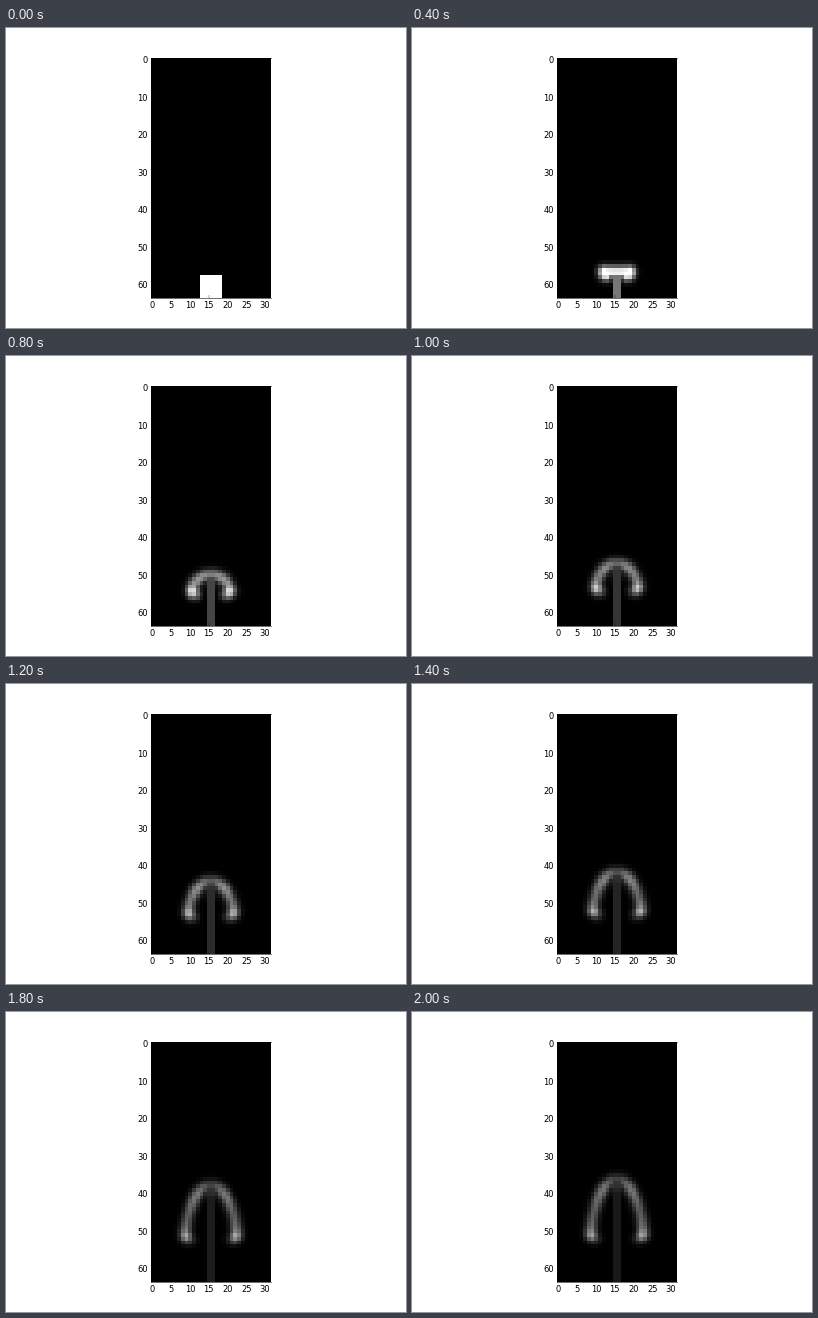
These frames come from a looping animation (400x300 px, 2.1 s). A matplotlib script:

```python
import numpy as np
import matplotlib.pyplot as plt
from matplotlib.animation import FuncAnimation

ROWS, COLS = 64, 32
FRAMES, INTERVAL = 21, 100
LIFTOFF = 4     # frames until the square has become a cap

row, col = np.mgrid[:ROWS, :COLS] + .5
off = abs(col - COLS / 2)


def bump(x, centre, width):
    return np.exp(-((x - centre) / width)**2 / 2)


def ramp(d, soft):
    return np.clip(d / soft + .5, 0, 1)


def smoothstep(x):
    x = np.clip(x, 0, 1)
    return x * x * (3 - 2 * x)


def block(u):
    """Initial square, lifting and spreading."""
    soft = .02 + u
    return (ramp(3 + 1.2 * u - off, soft) * ramp(row - 58 + 3 * u, soft)
            * ramp(64 - 5 * u - row, soft))


def plume(t):
    """Rising arch that curls inwards at its tips, with a trailing stem."""
    side = 49.5 + 11.8 * np.exp(-t / 9)
    apex = min(65.2 - 2.15 * t + .036 * t * t, side)
    reach = 7.4 * (1 - np.exp(-(t + .6) / 7.6))
    curl = .25 * reach

    # Half ellipse from apex to widest point, then a small circle inwards
    a = np.linspace(0, 2.8, 80)
    arch = a < np.pi / 2
    x = np.where(arch, reach * np.sin(a), reach - curl + curl * np.sin(a))
    y = side - np.where(arch, (side - apex) * abs(np.cos(a))**1.25,
                        curl * np.cos(a))
    glow = (.14 + 2.4 * np.exp(-t / 3.9)
            + .3 * min(t / 12, 1)**2 * bump(a, .6, .35)
            + .5 * bump(a, 1.9, .45))

    dist = np.hypot(off[..., None] - x, row[..., None] - y)
    ridge = (np.minimum(glow, 1.15) * bump(dist, 0, 1.1)).max(axis=-1)
    core = (.2 * smoothstep((t - 4) / 6)
            * bump(off, 0, 1.8) * bump(row, apex + 1.5, 1.8))
    return np.maximum(ridge, core), apex


def density(t):
    smoke, apex = plume(t)
    u = min(t / LIFTOFF, 1)
    mix = smoothstep(u)
    smoke = mix * smoke + (1 - mix) * block(u**1.3)
    stem = (.08 + .8 * np.exp(-t / 5.5)) * (off < 1) * (row > apex)
    return np.clip(np.maximum(smoke, stem), 0, 1)


plt.rcParams.update({"font.family": "DejaVu Sans", "font.size": 12})
fig, ax = plt.subplots(figsize=(8, 6), dpi=50, facecolor="white")
fig.subplots_adjust(left=.124, right=.899, bottom=.1, top=.9)
image = ax.imshow(density(0), cmap="gray", vmin=0, vmax=1,
                  interpolation="nearest")
ax.set_xticks(range(0, 31, 5))
ax.set_yticks(range(0, 61, 10))
ax.tick_params(direction="in", top=True, right=True,
               length=4, width=.5, pad=4)
ax.spines["right"].set_visible(False)


def update(n):
    image.set_data(density(n))
    return [image]


anim = FuncAnimation(fig, update, frames=FRAMES, interval=INTERVAL,
                     repeat=True, repeat_delay=0)
plt.show()
```
